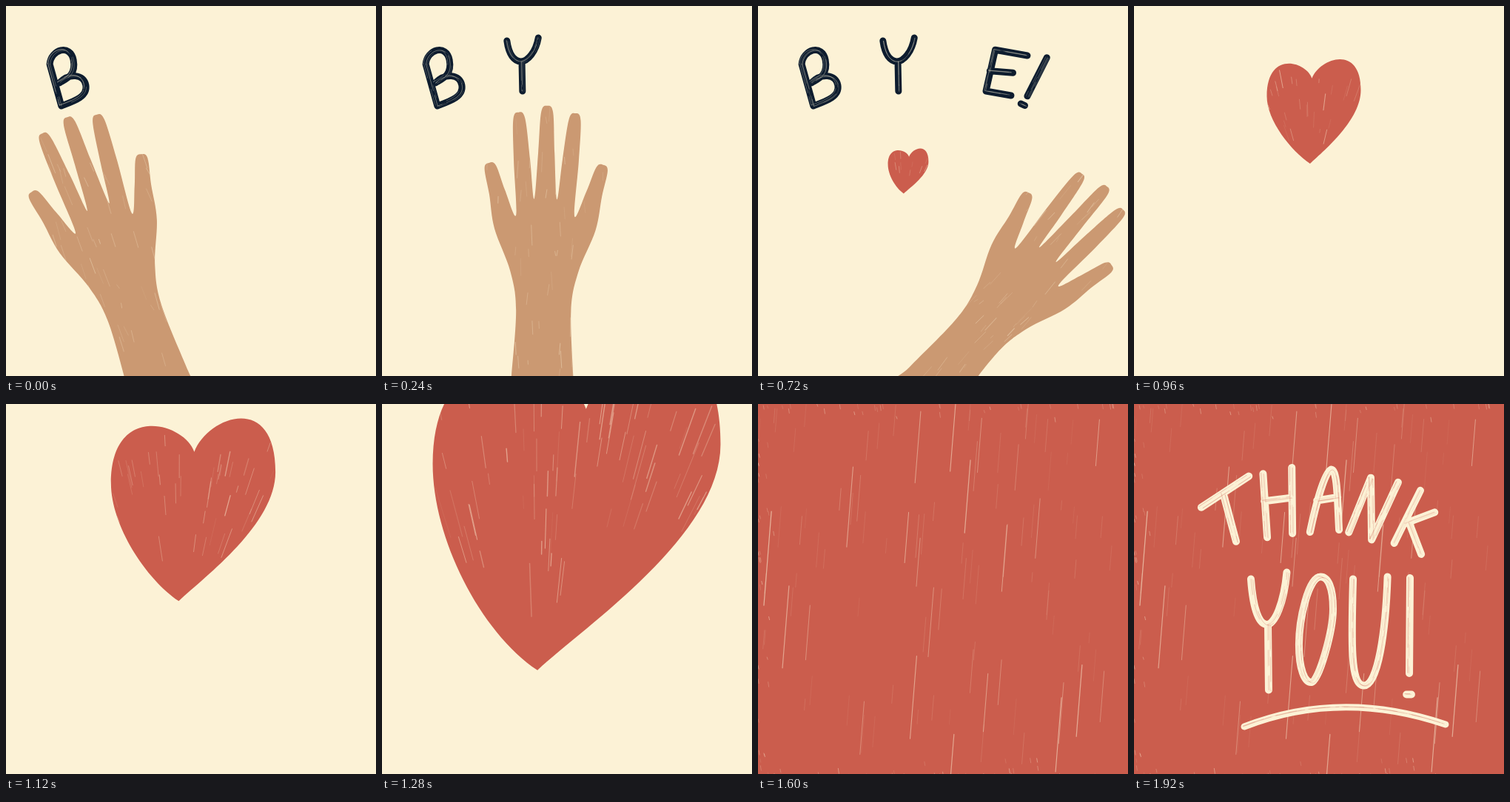
Recreate the animation shown at these times as an HTML page with a canvas. Size 500 by 500 pixels, loop 2.24 s.

```html
<!DOCTYPE html>
<html lang="en">
<head>
<meta charset="utf-8">
<title>Bye, thank you</title>
<style>
html, body { margin: 0; height: 100%; overflow: hidden; background: #fcf2d6; }
canvas { display: block; width: 100vw; height: 100vh; }
</style>
</head>
<body>
<canvas id="stage" width="500" height="500"></canvas>
<script>
const ctx = document.getElementById('stage').getContext('2d');
const CREAM = '#fcf2d6', SKIN = '#cb9972', RED = '#cb5d4d', NAVY = '#0d1c2e';
const LOOP = 2240, RAD = Math.PI / 180;

// Brush letters, centred on a grid about 100 units wide and high.
const GLYPHS = {
  A: 'M-38 50C-25 10 0 -50 20 -50S45 0 55 44M-21 0L45 -7',
  B: 'M-42 -37L-43 49M-42 -37C-25 -65 40 -65 35 -32S-10 0 -29 4C10 -10 55 0 51 23S0 47 -43 49',
  E: 'M55 -41L-50 -40L-54 44L28 43M-54 3L20 -2',
  H: 'M-30 -45L-38 55M64 -50L44 53M-35 -2L53 -3',
  K: 'M-32 -44L-50 48M36 -20L-40 13M-28 10L44 49',
  N: 'M-55 46L-22 -45L22 50L67 -47',
  O: 'M15 -49C-20 -49 -46 -10 -46 12S-30 47 -10 46S50 0 50 -20S35 -49 15 -49',
  T: 'M-80 -12L94 -40M0 -23V54',
  U: 'M-27 -47C-32 10 -35 49 4 49S65 0 70 -49',
  Y: 'M-48 -47C-42 -20 -25 -6 -3 -6S45 -25 53 -53M0 -6L2 53',
  '!': 'M0 -48L-2 38M-10 57L4 57'
};

function randomFrom(seed) {
  return () => (seed = (seed * 16807) % 2147483647) / 2147483647;
}

// Smooth closed curve through every point.
function closedCurve(points) {
  const path = new Path2D(), n = points.length;
  path.moveTo(...points[0]);
  points.forEach((q, i) => {
    const [p, r, s] = [i - 1, i + 1, i + 2].map(j => points[(j + n) % n]);
    path.bezierCurveTo(q[0] + (r[0] - p[0]) / 6, q[1] + (r[1] - p[1]) / 6,
      r[0] - (s[0] - q[0]) / 6, r[1] - (s[1] - q[1]) / 6, ...r);
  });
  return path;
}

function scratch(x1, y1, x2, y2, width, alpha) {
  ctx.globalAlpha = alpha;
  ctx.lineWidth = width;
  ctx.strokeStyle = CREAM;
  ctx.beginPath();
  ctx.moveTo(x1, y1);
  ctx.lineTo(x2, y2);
  ctx.stroke();
  ctx.globalAlpha = 1;
}

// A full stroke with a few dry bristle marks along it.
function brush(path, width, color, hairColor, random) {
  ctx.strokeStyle = color;
  ctx.lineWidth = width;
  ctx.stroke(path);
  ctx.strokeStyle = hairColor;
  ctx.lineWidth = .6;
  for (let i = 0; i < 4; i++) {
    const offset = (random() - .5) * width * .65;
    ctx.save();
    ctx.globalAlpha = .15 + random() * .35;
    ctx.setLineDash([15 + random() * 30, 5 + random() * 12]);
    ctx.translate(offset, offset * .4);
    ctx.stroke(path);
    ctx.restore();
  }
}

function letter(char, x, y, w, h, tilt) {
  const path = new Path2D();
  path.addPath(new Path2D(GLYPHS[char]),
    new DOMMatrix().translate(x, y).rotate(tilt).scale(w / 100, h / 100));
  return path;
}

// Each letter appears as the waving hand passes below it.
function bye(t) {
  const random = randomFrom(t + 17);
  const write = (char, x, y, tilt) => {
    if (t >= 1.2 * (x - 83)) brush(letter(char, x, y, 42, 68, tilt), 9, NAVY, CREAM, random);
  };
  write('B', 83, 98, -16);
  write('Y', 189, 79, 0);
  write('E', 336, 90, 11);
  write('!', 376, 99, 26);
}

function thankYou(t) {
  const random = randomFrom(41);
  const paint = (path, width) => brush(path, width, CREAM, RED, random);
  [...'THANK'].forEach((char, i) => {
    const k = i - 2;
    paint(letter(char, 256 + 65 * k, 131 + 4 * k + 4.5 * k * k, 42, 86, 3 + 9 * k), 10);
  });
  if (t < 1920) return;
  [...'YOU!'].forEach((char, i) => paint(letter(char, 181 + 64 * i, 307, 48, 150, 0), 10));
  paint(new Path2D('M149 436Q280 385 421 433'), 9);
}

// Upright hand above its pivot: five fingers fan out of a mirrored palm.
function handShape() {
  const fan = (degrees, length) =>
    [length * Math.sin(degrees * RAD), -150 - length * Math.cos(degrees * RAD)];
  const edge = [[45, -20], [42, 30], [37, 125], [46, 178], [68, 234]];
  const left = edge.map(([w, h]) => [-w, -h]);
  const right = edge.map(([w, h]) => [w, -h]).reverse();
  const valleys = [-1.5, -.5, .5, 1.5].map(j => fan(14 * j, 128 - 8 * j * j));
  const gaps = [left.at(-1), ...valleys, right[0]];
  const outline = [...left];
  for (let i = -2; i <= 2; i++) {
    const [a, b] = [gaps[i + 2], gaps[i + 3]];
    const [x, y] = [(a[0] + b[0]) / 2, (a[1] + b[1]) / 2];
    const tip = fan(i * (8 + i * i), 251 - 3.5 * i ** 2 - 3 * i ** 4);
    const dx = tip[0] - x, dy = tip[1] - y, length = Math.hypot(dx, dy);
    const at = (k, side) => [x + dx * k - dy / length * side, y + dy * k + dx / length * side];
    outline.push(at(.5, -11), at(.93, -8), at(1, 0), at(.93, 8), at(.5, 11), b);
  }
  return closedCurve([...outline, ...right.slice(1)]);
}
const HAND = handShape();

function hand(t) {
  const sink = Math.max(0, t - 720), scale = 1.02 - t * .00007;
  const random = randomFrom(t + 5);
  ctx.save();
  ctx.translate(216 - sink * .55, 537 + sink * 1.2);
  ctx.rotate((-19 + t * .0835) * RAD);
  ctx.scale(scale, scale);
  ctx.fillStyle = SKIN;
  ctx.fill(HAND);
  ctx.clip(HAND);
  for (let i = 0; i < 90; i++) {
    const x = random() * 190 - 95, y = -30 - random() * 360, length = 5 + random() * 22;
    scratch(x, y, x + random() * 4 - 2, y - length, .5 + random() * .6, .1 + random() * .3);
  }
  ctx.restore();
}

// The heart grows at a steady ratio; its tip rises first, then sinks with the growth.
function heart(t) {
  const age = t - 960;
  const w = 127 * 1.75 ** (age / 160), h = w * 1.12;
  const x = 243 + age / (age < 0 ? 6 : 16) - w / 2;
  const y = 213 + .56 * Math.abs(w - 127) - h;
  const tip = .46 - .0003 * Math.abs(age), notch = .48 + .55 * (.46 - tip);
  const shape = new Path2D();
  const bend = (...c) => shape.bezierCurveTo(...c.map((v, i) => i % 2 ? y + v * h : x + v * w));
  shape.moveTo(x + notch * w, y + .19 * h);
  bend(notch - .06, .03, 0, -.08, 0, .36);
  bend(0, .59, tip - .2, .88, tip, 1);
  bend(tip + .17, .86, 1, .58, 1, .3);
  bend(1, -.14, notch + .08, 0, notch, .19);

  const random = randomFrom(t + 3);
  ctx.save();
  ctx.fillStyle = RED;
  ctx.fill(shape);
  ctx.clip(shape);
  for (let i = 0; i < Math.min(90, w / 5); i++) {
    const u = random(), v = .08 + random() * .6, length = .03 + random() * .14;
    const slope = (u - tip) / (1.15 - v) * .7;
    scratch(x + u * w, y + v * h, x + (u - slope * length) * w, y + (v + length) * h,
      .5 + random() * Math.min(1, w / 200), .1 + random() * .4);
  }
  ctx.restore();
}

// Red paint with falling dry marks and worn edges.
function redPaint() {
  const random = randomFrom(77);
  ctx.fillStyle = RED;
  ctx.fillRect(0, 0, 500, 500);
  for (let i = 0; i < 100; i++) {
    const x = random() * 500, y = random() ** 1.6 * 450, strength = random() ** 4;
    const length = 12 + random() * 40 + strength * 80;
    scratch(x, y, x - length * .08, y + length, .6 + strength * .7, .08 + random() * .15 + strength * .4);
  }
  for (let i = 0; i < 90; i++) {
    const along = random() * 500, depth = random() ** 3 * 22;
    const [x, y] = [[depth, along], [along, depth], [along, 500 - depth]][i % 3];
    scratch(x, y, x + 1, y + 3 + random() * 4, 1, .1 + random() * .3);
  }
}

function draw(t) {
  ctx.fillStyle = CREAM;
  ctx.fillRect(0, 0, 500, 500);
  ctx.lineCap = ctx.lineJoin = 'round';
  if (t >= 1600) {
    redPaint();
    if (t >= 1680) thankYou(t);
    return;
  }
  if (t < 880) bye(t);
  if (t < 960) hand(t);
  if (t >= 640) heart(t);
}

// Pictures change every 80 ms while the hand waves, every 160 ms while the heart grows.
function held(time) {
  if (time >= 1920) return 1920;
  if (time >= 1680) return 1680;
  const step = time < 960 ? 80 : 160;
  return Math.floor(time / step) * step;
}

let shown = -1;
function tick() {
  const t = held(performance.now() % LOOP);
  if (t !== shown) draw(shown = t);
  requestAnimationFrame(tick);
}
tick();
</script>
</body>
</html>
```
